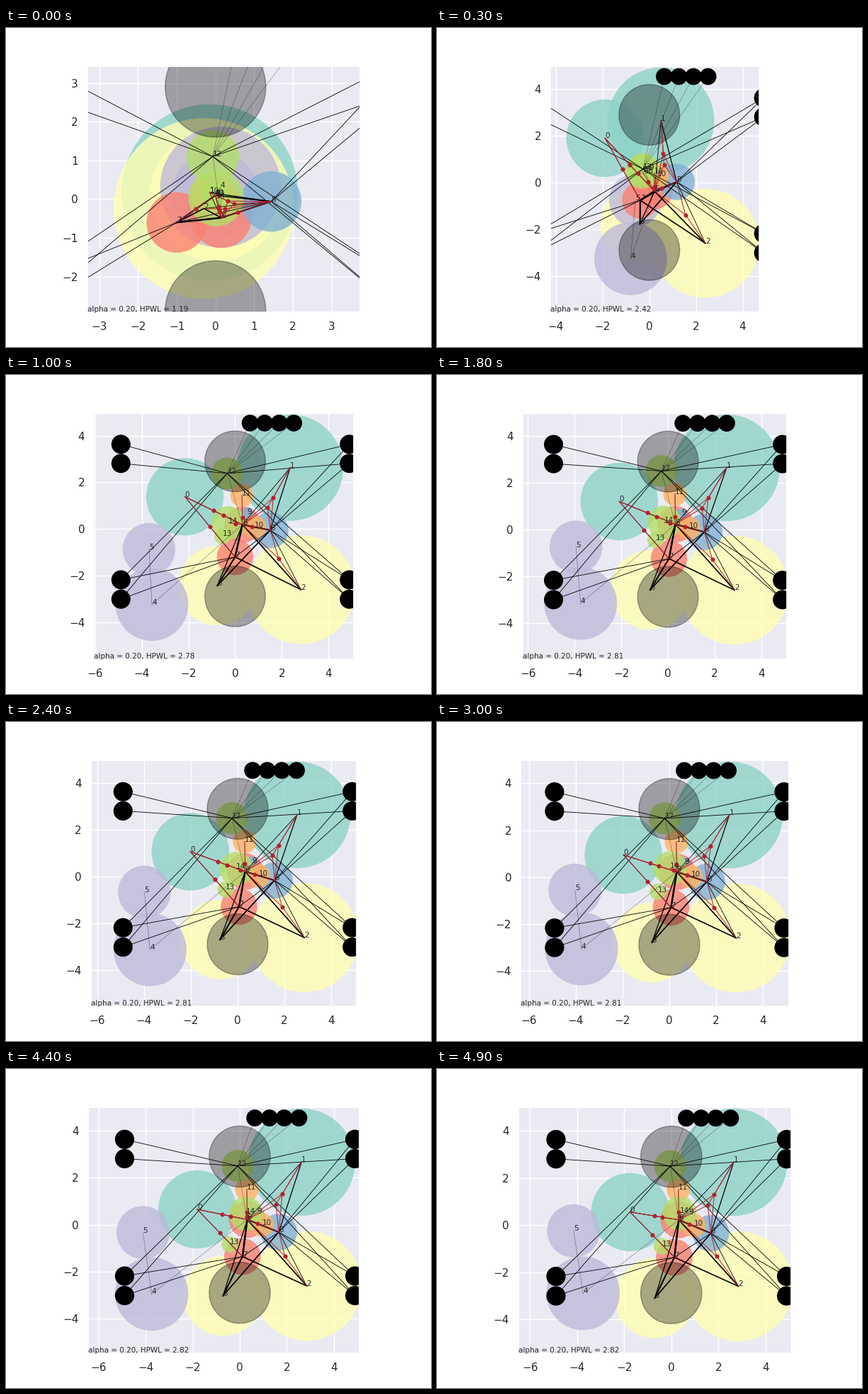
A matplotlib script for the animation above (5 s loop, 600 by 450 pixels).

```python
import math
import numpy as np
import matplotlib.pyplot as plt
from matplotlib.animation import FuncAnimation
from matplotlib.patches import Circle

FRAMES, INTERVAL = 50, 100
KICK_FRAMES, SETTLE = 3, 2.5

TEAL, YELLOW, PURPLE, RED = "#8dd3c7", "#ffffb3", "#bebada", "#fb8072"
BLUE, ORANGE, GREEN, CRIMSON = "#80b1d3", "#fdb462", "#b3de69", "#b3202f"

plt.rcParams.update({
    "font.family": "DejaVu Sans", "text.color": ".15",
    "axes.facecolor": "#eaeaf2", "axes.edgecolor": "white",
    "axes.linewidth": 1.25, "axes.grid": True, "axes.axisbelow": True,
    "grid.color": "white", "grid.linewidth": 1, "grid.linestyle": "-",
    "xtick.color": ".15", "ytick.color": ".15",
    "xtick.labelsize": 11, "ytick.labelsize": 11,
    "xtick.major.size": 0, "ytick.major.size": 0,
    "xtick.major.pad": 9.5, "ytick.major.pad": 9.5,
})


def motion(start, kick, rest, drift=0):
    """Jump from start to kick, settle exponentially at rest, then drift slowly."""
    start, kick, rest, drift = (np.asarray(v, float) for v in (start, kick, rest, drift))

    def at(frame):
        if frame < KICK_FRAMES:
            s = 1 - (1 - frame / KICK_FRAMES) ** 2
            return start + (kick - start) * s
        late = frame - KICK_FRAMES
        settled = 1 - math.exp(-late / SETTLE)
        return kick + (rest - kick) * settled + drift * late / (FRAMES - 1 - KICK_FRAMES)
    return at


nodes = []


def node(color, radius, kick, rest, drift=(0, 0), start=(0, 0.1)):
    nodes.append((color, radius, motion(start, kick, rest, drift)))


node(TEAL, 1.66, (-1.9, 1.9), (-2.25, 1.5), (0.5, -0.95))
node(TEAL, 2.28, (0.5, 2.65), (2.45, 2.62), (0.2, 0.05), start=(-0.15, 0.17))
node(YELLOW, 2.33, (2.4, -2.6), (2.85, -2.6), start=(-0.3, -0.24))
node(YELLOW, 1.70, (-0.4, -1.77), (-0.8, -2.35), (0.1, -0.75))
node(PURPLE, 1.56, (-0.8, -3.26), (-3.75, -3.3), (0, 0.4), start=(0.13, 0.31))
node(PURPLE, 1.13, (-0.6, -0.76), (-3.85, -1), (-0.3, 0.75))
node(RED, 0.78, (0.22, -0.37), (0.32, 0.22), start=(0.15, -0.48))
node(RED, 0.78, (-0.39, -0.76), (0, -1.2), (0.13, -0.17), start=(-1, -0.6))
node(BLUE, 0.78, (1.17, 0.03), (1.5, 0), (0.18, -0.35), start=(1.44, -0.06))
node(BLUE, 0.28, (0, 0.55), (0.5, 0.7), (0.25, -0.25))
node(ORANGE, 0.5, (0.34, 0.27), (0.85, 0.08), (0.12, -0.1), start=(-0.15, 0.15))
node(ORANGE, 0.5, (0.2, 0.4), (0.3, 1.5))
node(GREEN, 0.68, (-0.27, 0.58), (-0.4, 2.5), (0.35, 0), start=(-0.07, 1.1))
node(GREEN, 0.35, (-0.2, 0.4), (-0.6, -0.25), (0.2, -0.65))
node(GREEN, 0.72, (-0.3, 0.46), (-0.4, 0.2), (0.75, 0.3), start=(0.02, 0.02))

lower_left = motion((-3.31, -2.91), (-4.23, -5.54), (-6.1, -5.6), (-0.4, 0.17))
upper_right = motion((3.74, 3.43), (4.7, 4.98), (5.1, 4.95), (0, 0.05))
hpwl = motion(1.19, 2.42, 2.8, 0.02)

TOP_PADS = [(0.64 + 0.625 * i, 4.54) for i in range(4)]
SIDE_PADS = [(side * 4.9, y) for side in (-1, 1) for y in (3.63, 2.81, -2.18, -3.01)]

# Each joint sits at the mean of its hubs; a repeated hub pulls harder.
JOINTS = [(0, 6), (0, 6, 6), (0, 7), (1, 1, 8, 6), (1, 8, 6), (2, 2, 8, 6),
          (11, 6, 6, 6), (14, 6), (6, 6, 8)]

# Line width: pairs of connected nodes.
WIRES = {
    1.8: [(6, 7)],
    1.5: [(6, 8), (3, 7)],
    1.2: [(3, 8), (2, 6), (2, 7)],
    0.9: [(1, 8), (3, 6)],
    0.6: [(2, 8), (1, 6), (0, 6), (0, 7), (7, 8)],
    0.4: [(6, 12), (6, 11), (4, 5), (4, 6)],
}

fig, ax = plt.subplots(figsize=(6, 4.5), dpi=100, facecolor="white")
fig.subplots_adjust(left=0.125, right=0.9, bottom=0.11, top=0.88)


def disc(center, radius, color, **style):
    ax.add_patch(Circle(center, radius, color=color, **style))


def wire(a, b, width, color="black", alpha=1):
    ax.plot([a[0], b[0]], [a[1], b[1]], color=color, lw=width, alpha=alpha)


def draw(frame):
    ax.clear()
    pos = [path(frame) for _, _, path in nodes]

    for p, (color, radius, _) in zip(pos, nodes):
        disc(p, radius, color, alpha=0.8, lw=0)
    for y in (2.9, -2.89):
        disc((0, y), 1.3, "black", alpha=0.33, lw=1)
    for pad in SIDE_PADS:
        disc(pad, 0.41, "black", lw=0)
        wire(pad, pos[12], 0.6)
        if pad[0] > 0:
            wire(pad, pos[8], 0.6)
        elif pad[1] < 0:
            wire(pad, pos[7], 0.6)
    for pad in TOP_PADS:
        disc(pad, 0.36, "black", lw=0)
        wire(pad, pos[12], 0.4, alpha=0.45)

    for width, pairs in WIRES.items():
        for a, b in pairs:
            wire(pos[a], pos[b], width, alpha=1 if width > 0.5 else 0.5)

    for hubs in JOINTS:
        p = np.mean([pos[hub] for hub in hubs], axis=0)
        for hub in set(hubs):
            wire(p, pos[hub], 0.8, CRIMSON, 0.9)
        ax.plot(*p, "o", color=CRIMSON, ms=4.4, mew=0)

    for i, p in enumerate(pos):
        ax.text(*p, str(i), fontsize=7.5)
    ax.text(0, 0, f"alpha = 0.20, HPWL = {hpwl(frame):.2f}",
            transform=ax.transAxes, fontsize=7.5)

    (x0, y0), (x1, y1) = lower_left(frame), upper_right(frame)
    ax.set(xlim=(x0, x1), ylim=(y0, y1), aspect="equal")
    return []


anim = FuncAnimation(fig, draw, frames=FRAMES, interval=INTERVAL,
                     init_func=lambda: draw(0), repeat=True, repeat_delay=0)
plt.show()
```
